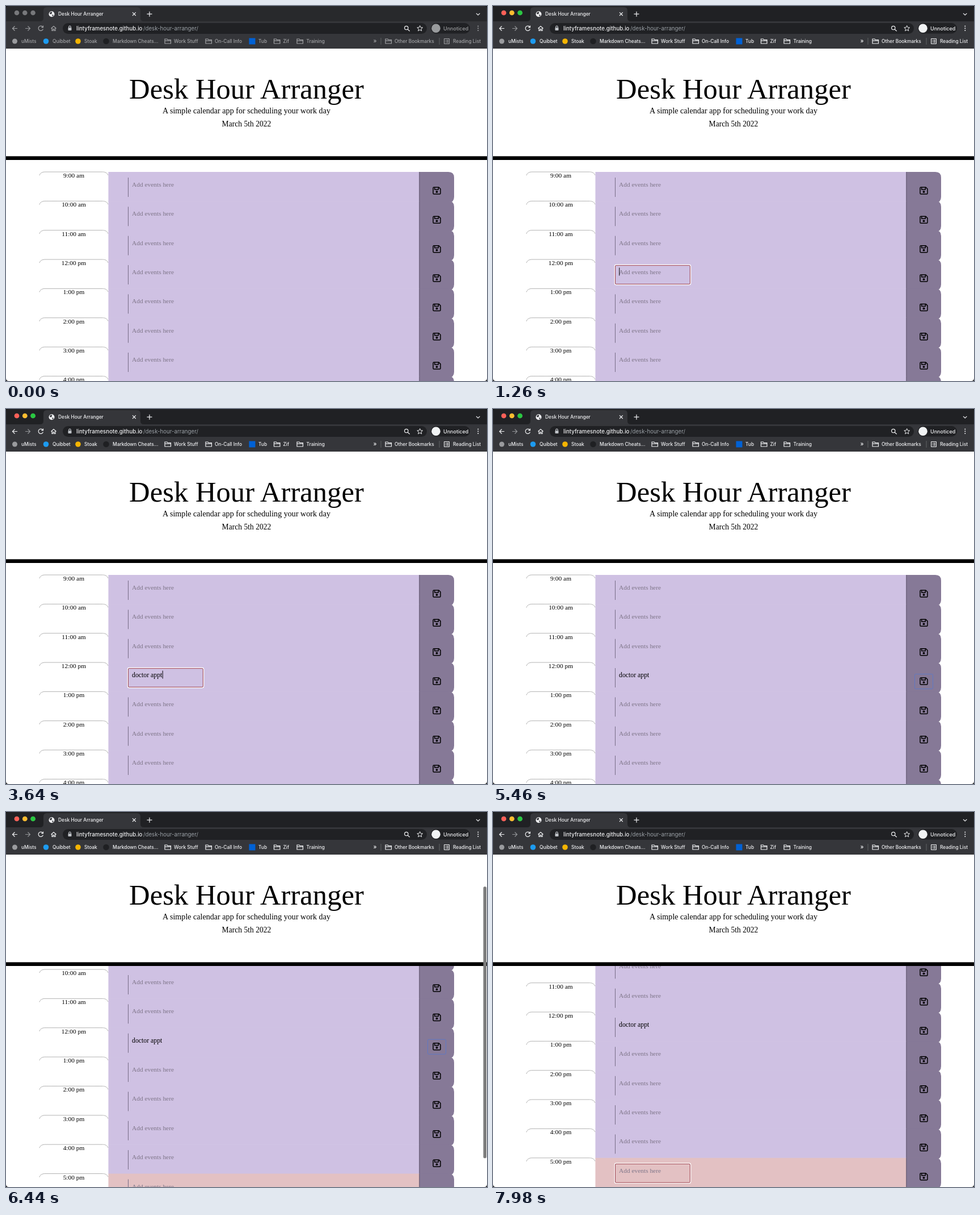
An HTML page that plays this animation: 848x660 px, repeating every 8000 ms.

```html
<!DOCTYPE html>
<html lang="en">
<head>
<meta charset="utf-8">
<title>Desk Hour Arranger</title>
<style>
  html, body { margin: 0; width: 100%; height: 100%; overflow: hidden; background: #fff; }
  svg { display: block; width: 848px; height: 660px; }
  text { white-space: pre; }
  .page { font-family: "Liberation Serif", "Noto Serif", serif; }
  .chrome { font: 500 8.4px Inter, Roboto, sans-serif; fill: #f0f1f3; }
  .line { fill: none; stroke: #f0f1f3; stroke-width: 1.2; }
  .mid { text-anchor: middle; }
  .time { font-size: 11.4px; }
  .hint { font-size: 11.4px; fill: #7f7689; }
  .entry { font-size: 11.8px; fill: #000; }
</style>
</head>
<body>
<svg viewBox="0 0 848 660">
  <rect width="848" height="660" fill="#fff"/>
  <g class="page">
    <g id="rows"></g>
    <rect y="75" width="848" height="190" fill="#fff"/>
    <rect y="264.4" width="848" height="6.6"/>
    <g class="mid">
      <text x="424" y="163" font-size="50.7">Desk Hour Arranger</text>
      <text x="424" y="189" font-size="14.1">A simple calendar app for scheduling your work day</text>
      <text x="424" y="212" font-size="13.6">March 5th 2022</text>
    </g>
    <rect id="thumb" x="841.5" width="5.5" height="478" rx="2.7" fill="#7d7d7d"/>
  </g>
  <g class="chrome" id="chrome"></g>
  <path d="M0 655v5h5q-5 0-5-5zM848 655v5h-5q5 0 5-5zM0 5V0h5q-5 0-5 5zM848 5V0h-5q5 0 5 5z" fill="#111"/>
</svg>

<script>
const $ = id => document.getElementById(id);
const LOOP = 8000, TOP = 292, PITCH = 51.35;
const NOON = 3, FIVE = 8;

// Scheduler rows
const hours = ['9:00 am', '10:00 am', '11:00 am', '12:00 pm', '1:00 pm',
               '2:00 pm', '3:00 pm', '4:00 pm', '5:00 pm'];

const disk = `<g fill="none" stroke="#000" stroke-width="1.5" stroke-linejoin="round">
  <path d="M754.5 27H763L766 30V37.5Q766 39 764.5 39H754.5Q753 39 753 37.5V28.500Q753 27 754.500 27Z"/>
  <path d="M755.700 27.500V31H762.300V27.500"/></g>
  <circle cx="759.500" cy="35" r="1.900"/>`;

const row = (hour, i) => `<g transform="translate(0 ${TOP + i * PITCH})">
  <path d="M59 6Q61 0 69 0H170Q178 0 180 6" fill="none" stroke="#777" stroke-width=".8" stroke-dasharray="1.4 .6"/>
  <text class="time mid" x="119.500" y="10">${hour}</text>
  <rect x="180.500" width="548.500" height="${PITCH + 0.5}" fill="${i === FIVE ? '#e3c1c3' : '#cfc1e3'}"/>
  <path d="M729 0H780Q790 0 790 10V44Q790 54 780 54H729Z" fill="#867997"/>
  <path d="M728.800 0V54" stroke="#574d66"/>
  <path class="edge" d="M215.500 10V44" stroke="#776d86"/>
  <text class="hint" x="222" y="26">Add events here</text>
  ${disk}</g>`;

$('rows').innerHTML = hours.map(row).join('');

const focusBox = `<g fill="none"><rect x="214.500" y="9.500" width="134" height="35" rx="2.500" stroke="#fff" stroke-width="1.400"/>
  <rect x="215.600" y="10.600" width="131.800" height="32.800" rx="1.500" stroke="#a04450"/></g>`;

function addField(i) {
  const g = $('rows').children[i];
  g.insertAdjacentHTML('beforeend', `<g class="focus">${focusBox}</g>
    <text class="entry" x="222" y="26"></text>
    <path class="caret" d="M222.800 14.500V28.500" stroke="#000"/>`);
  const part = name => g.querySelector('.' + name);
  return { hint: part('hint'), focus: part('focus'), entry: part('entry'), caret: part('caret'), row: g };
}
const noon = addField(NOON), five = addField(FIVE);
noon.row.insertAdjacentHTML('beforeend',
  '<rect id="ring" x="743.500" y="20.500" width="32" height="26" rx="2" fill="none" stroke="#5f78c4"/>');

// Browser window
const label = (x, text, y = 65) => `<text x="${x}" y="${y}">${text}</text>`;
const line = (d, more = '') => `<path class="line" d="${d}" ${more}/>`;
const dot = (x, y, r, fill) => `<circle cx="${x}" cy="${y}" r="${r}" fill="${fill}"/>`;
const folder = x => line(`M${x - 5} 66V58H${x - 1}L${x} 59.500H${x + 5.500}V66ZM${x - 5} 61.200H${x + 5.500}`);
const lights = colors => colors.map((c, i) => dot(19 + i * 14.3, 12, 4.3, c)).join('');

$('chrome').innerHTML = `
  <rect width="848" height="75" fill="#35363a"/>
  <rect width="848" height="27" fill="#202124"/>
  <rect id="idleStrip" width="848" height="27" fill="#28292c"/>
  <path d="M60 27Q66 27 66 21V8Q66 2 72 2H231Q237 2 237 8V21Q237 27 243 27Z" fill="#35363a"/>
  ${lights(['#77787b', '#77787b', '#77787b'])}
  <g id="lights">${lights(['#fe5f57', '#febc2e', '#28c840'])}</g>
  ${dot(80.5, 14.3, 5, '#f0f1f3')}
  <path d="M77 12l3-2 1.500 2-2 2.500-2-.5zM81 15l3 1-2 2.500z" fill="#35363a"/>
  ${label(92, 'Desk Hour Arranger', 17.2)}
  ${line('M223 11.200l5.800 5.800m0-5.800l-5.800 5.800M248.500 14.200h9m-4.500-4.500v9M829 12.800l3.200 3.200 3.200-3.200')}
  <rect x="100" y="30" width="642" height="19" rx="9.500" fill="#202124"/>
  <rect x="749" y="30" width="69" height="18.500" rx="9.250" fill="#202124"/>
  <rect x="109.500" y="38" width="6" height="5" rx=".7" fill="#bdc1c6"/>
  ${line('M110.700 38.500v-1.500a1.800 1.800 0 0 1 3.600 0v1.500', 'style="stroke:#bdc1c6"')}
  <text x="124" y="43" font-size="9.700">lintyframesnote.github.io</text>
  <text x="242" y="43" font-size="9.700" font-weight="400" fill="#9aa0a6">/desk-hour-arranger/</text>
  ${line('M708 41l3.800 3.300M709 38.500a3.200 3.200 0 1 1-6.400 0a3.200 3.200 0 1 1 6.400 0')}
  ${line('M729.700 34.500l1.400 3.200 3.500.3-2.700 2.300.8 3.500-3-1.900-3 1.900.8-3.500-2.700-2.300 3.500-.3z', 'style="stroke-width:1"')}
  ${line('M42.500 39.500h-8.500m4.500-4l4 4-4 4', 'opacity=".5"')}
  <g id="live">
    ${line('M11.500 39.500h8.500m-4.500-4l-4 4 4 4M64.800 36.800a4.200 4.200 0 1 0 .6 3.700M65.500 34.500v3.200h-3.200M79.500 39.500l4.500-4 4.500 4M81 38.500v5h2v-3h2v3h2v-5')}
    ${dot(758, 39.3, 7.8, '#f1f3f4')}
    <text x="771" y="42.700" font-size="9">Unnoticed</text>
    ${[35.5, 39.3, 43.1].map(y => dot(832.3, y, 1, '#f0f1f3')).join('')}
    ${label(27, 'uMists')}${label(82, 'Quibbet')}${label(138, 'Stoak')}
    ${label(188, 'Markdown Cheats...')}${label(296, 'Work Stuff')}
    ${label(368, 'On-Call Info')}${label(445, 'Tub')}${label(488.5, 'Zif')}
    ${label(529.5, 'Training')}${label(685, 'Other Bookmarks')}${label(788, 'Reading List')}
    <text x="647.500" y="65" font-size="10">»</text>
    ${[285, 357, 477.5, 518, 674].map(folder).join('')}
    ${line('M772.500 57.500h9v9h-9zM774 60h1m1.200 0h4M774 62h1m1.200 0h4M774 64h1m1.200 0h4', 'style="stroke-width:1"')}
  </g>
  <path d="M661 56v12M764 56v12" stroke="#606265"/>
  ${dot(15.5, 62, 4.5, '#9a9b9e')}${dot(70.5, 62, 4.8, '#1d9bf0')}
  ${dot(127, 62, 4.8, '#f4b400')}${dot(176.5, 62, 5.3, '#1f2023')}
  <rect x="428.500" y="56.500" width="11" height="11" fill="#0061d5"/>`;

// Timeline: each track holds [time, value] pairs, and a value lasts until the next one.
const at = (track, t) => track.reduce((v, [time, next]) => t >= time ? next : v, track[0][1]);
const word = 'doctor appt';
const keyTimes = [2240, 2380, 2450, 2870, 3010, 3080, 3150, 3290, 3360, 3500, 3640];
const tracks = {
  active: [[0, 0], [770, .7], [840, 1]],
  noonFocus: [[0, 0], [1260, 1], [5110, 0]],
  noonCaret: [[0, 0], [1260, 1], [1820, 0], [2240, 1], [4200, 0], [4760, 1], [5110, 0]],
  ring: [[0, 0], [5320, .35], [5390, .7], [5460, 1], [7490, 0]],
  scroll: [[0, 0], [6230, 3], [6300, 19.3], [6370, 43], [6440, 66.3], [6510, 94]],
  thumb: [[0, 0], [6300, 1], [7140, .7], [7210, .35], [7280, 0]],
  fiveFocus: [[0, 0], [7490, 1]],
  fiveCaret: [[0, 0], [7490, 1], [7980, 0]],
};
const fade = (node, value) => node.setAttribute('opacity', value);

function draw() {
  const t = performance.now() % LOOP;
  const now = name => at(tracks[name], t);

  fade($('idleStrip'), 1 - now('active'));
  fade($('lights'), now('active'));
  fade($('live'), .58 + .42 * now('active'));

  const typed = word.slice(0, keyTimes.filter(k => t >= k).length);
  if (noon.entry.textContent !== typed) noon.entry.textContent = typed;
  const width = typed ? noon.entry.getComputedTextLength() : 0;
  noon.caret.setAttribute('transform', `translate(${width} 0)`);
  fade(noon.hint, typed ? 0 : 1);
  fade(noon.focus, now('noonFocus'));
  fade(noon.caret, now('noonCaret'));
  fade(five.focus, now('fiveFocus'));
  fade(five.caret, now('fiveCaret'));
  fade($('ring'), now('ring'));

  const scroll = now('scroll');
  $('rows').setAttribute('transform', `translate(0 ${-scroll})`);
  $('thumb').setAttribute('y', 77.3 + scroll * .815);
  fade($('thumb'), now('thumb'));
  requestAnimationFrame(draw);
}
draw();
</script>
</body>
</html>
```
